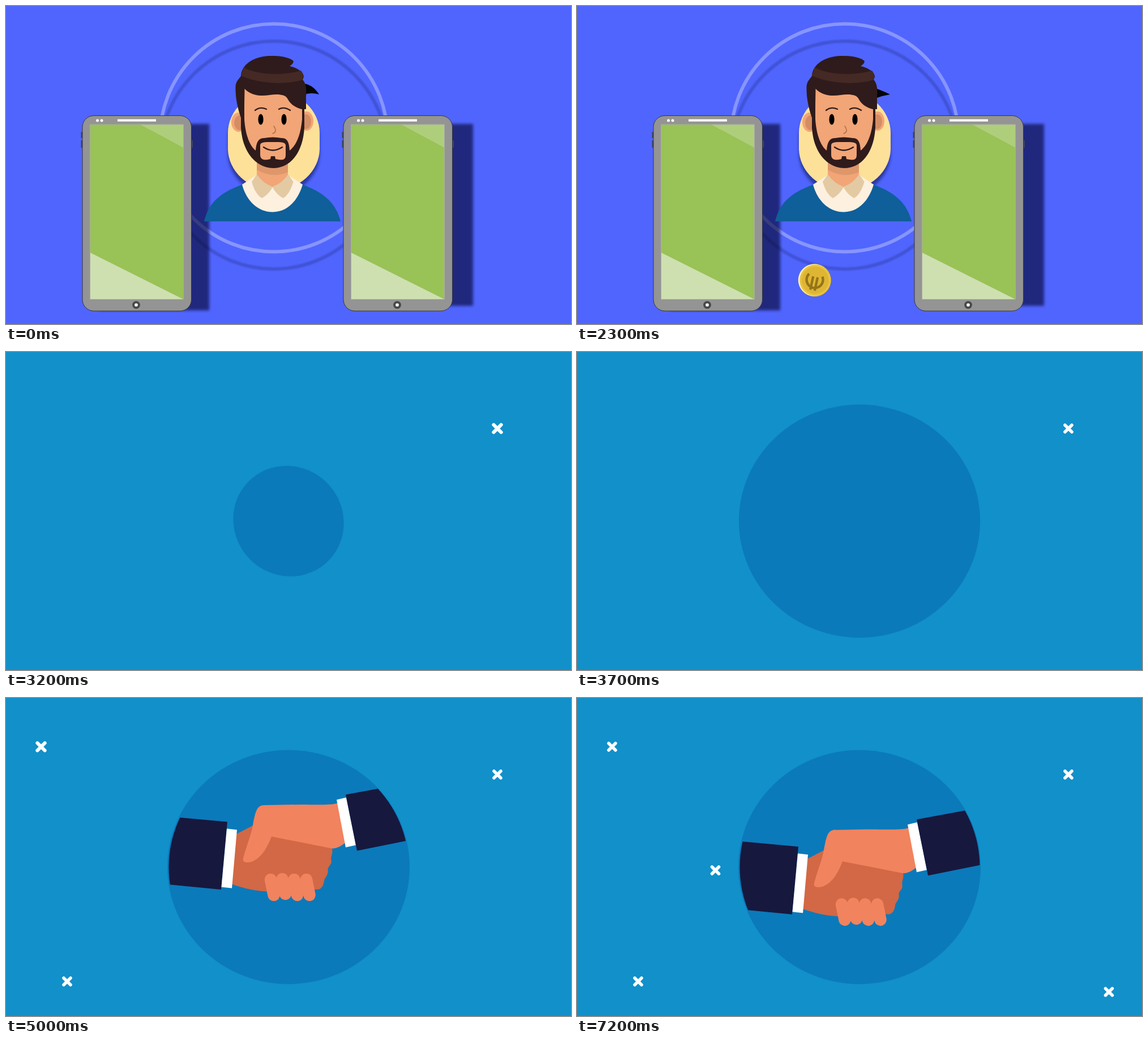
Animation, 998 px wide and 561 px high, one loop 7.3 s. Source, as an HTML page:

```html
<!DOCTYPE html>
<html lang="en">
<head>
<meta charset="utf-8">
<title>Mobile payment and handshake</title>
<style>
html, body { margin: 0; width: 100%; height: 100%; overflow: hidden; background: #5065fe; }
svg { display: block; width: 100%; height: 100%; }
</style>
</head>
<body>
<svg viewBox="0 0 998 561">
  <defs>
    <filter id="soft" x="-20%" y="-20%" width="140%" height="140%"><feGaussianBlur stdDeviation="2.5"/></filter>
    <filter id="faint"><feGaussianBlur stdDeviation="1.2"/></filter>
    <filter id="speed" filterUnits="userSpaceOnUse" x="200" y="100" width="600" height="900">
      <feGaussianBlur id="blur" stdDeviation="0 0"/>
    </filter>
    <clipPath id="disc"><ellipse cx="499.5" cy="298.5" rx="212" ry="207"/></clipPath>
    <g id="phone">
      <path d="M134 222v11M134 237v13M328.5 237v13" stroke="#41445c" stroke-width="3"/>
      <rect x="135" y="193.5" width="192.500" height="344.500" rx="20" fill="#949494" stroke="#35363c"/>
      <rect x="148.500" y="209" width="165" height="308.500" fill="#99c257"/>
      <path d="M148.500 435L313.500 517.500H148.500Z" fill="#cee0b0"/>
      <path d="M237 209H313.500V250Z" fill="#afce7c"/>
      <rect x="148.500" y="209" width="165" height="308.500" fill="none" stroke="#a9aba4"/>
      <path d="M197 201.700H265" stroke="#fff" stroke-width="4"/>
      <g fill="#fff"><circle cx="161.500" cy="202" r="2.500"/><circle cx="169" cy="202" r="2.500"/></g>
      <circle cx="230" cy="527.300" r="4.900" fill="#fff" stroke="#484848" stroke-width="4"/>
    </g>
    <path id="cross" d="M-6-6L6 6M6-6L-6 6" stroke="#fff" stroke-width="5.600" stroke-linecap="round"/>
    <path id="flap" d="M443 297L434 310C438 325 445 335 452 339C460 335 467 327 471 319Q454 313 443 297Z" fill="#e3caa3"/>
  </defs>

  <g id="pay">
    <rect width="998" height="561" fill="#5065fe"/>
    <circle cx="473" cy="263" r="201" fill="none" stroke="#4152d6" stroke-width="6" filter="url(#faint)"/>
    <circle cx="473" cy="232.500" r="201" fill="none" stroke="#8795ff" stroke-width="6"/>
    <g fill="#000526" fill-opacity=".6" filter="url(#soft)">
      <rect x="165" y="208" width="194" height="329"/>
      <rect x="626" y="208" width="199" height="321"/>
    </g>
    <rect x="392" y="159" width="162" height="175" rx="81" ry="74" fill="#1d2a80" opacity=".75" filter="url(#soft)"/>
    <rect x="392" y="150" width="162" height="175" rx="81" ry="74" fill="#fee199"/>

    <g id="person">
      <path id="spike" fill="#050508"/>
      <path d="M350 380C357 350 374 331 417 315H524C566 331 583 350 591 380Z" fill="#0f5f9b"/>
      <path d="M417 315L443 298H498L524 315C515 345 496 363.500 471 363.500S425 345 417 315Z" fill="#fef0df"/>
      <path d="M443 265H498V298Q487 315 471 320Q454 315 443 298Z" fill="#f2a576"/>
      <path d="M443 270H498V293Q471 305 443 289Z" fill="#de976b"/>
      <use href="#flap"/>
      <use href="#flap" transform="matrix(-1 0 0 1 941.500 0)"/>
      <g fill="#f2a576"><ellipse cx="411" cy="205" rx="13" ry="17"/><ellipse cx="531" cy="203" rx="12" ry="17"/></g>
      <g fill="#d58d63"><ellipse cx="413" cy="206" rx="10" ry="13"/><ellipse cx="530" cy="204" rx="9" ry="13"/></g>
      <path d="M415 150V215C418 262 445 286 472 286C500 286 524 262 527 215V150Z" fill="#2f1b1b"/>
      <path d="M420 135L421 200C423 230 432 248 441 255C442 240 446 233 456 233Q471 230 487 233C497 233 500 240 501 255C511 247 520 232 523 200V135Z" fill="#f2a576"/>
      <path d="M449 246C449 240 456 240 471 240S494 240 494 246V262C494 271 490 272 482 271L476 270L475 265H468L467 270C455 273 449 271 449 262Z" fill="#f2a576"/>
      <g fill="none" stroke="#2f1b1b" stroke-width="2.300" stroke-linecap="round">
        <path d="M455 249Q471 260 488 249M440 184Q449 177 460 182M482 182Q491 177 502 184"/>
        <path d="M473 212Q480 222 471 225" stroke="#b9754d" stroke-width="1.800"/>
      </g>
      <ellipse cx="450" cy="200" rx="4.600" ry="9.500"/>
      <ellipse cx="491" cy="200" rx="4.600" ry="9.500"/>
      <path d="M416 200C408 178 405 160 405.500 142C406 131 414 127 415 123C416 104 436 89 466 88C492 87 507 94 508 98C507 102 504 104 501 106C518 110 526 118 526 125L524 130C530 137 531 145 530 160V182H522C508 178 501 171 497 163C493 156 480 155 466 157C448 160 432 157 421.500 146L420.500 200Z" fill="#2f1b1b"/>
      <path d="M415 123L420 108C440 121 490 124 521 114Q527 121 524 130C495 140 445 137 415 123Z" fill="#452924"/>
    </g>

    <g id="coin">
      <circle r="29" fill="#c9a02c"/>
      <circle cy="-.800" r="28.300" fill="#fbf0bd"/>
      <circle cy="1" r="27.500" fill="#e9c340"/>
      <circle cy="1" r="24" fill="#deb634"/>
      <path d="M9-12A14.500 14.500 0 1 0 9 12M-18-4H6M-18 4H6" fill="none" stroke="#967517" stroke-width="4.300"/>
    </g>
    <use href="#phone"/>
    <use href="#phone" x="461"/>
  </g>

  <g id="deal">
    <rect width="998" height="561" fill="#1190ca"/>
    <ellipse id="spot" fill="#0b7aba"/>
    <g clip-path="url(#disc)">
      <g id="hands">
        <path d="M270 257L391 268L380 387.500L270 377Z" fill="#17183e"/>
        <path d="M404 291L437 274L480 280L576 315C578 325 573 328 574.500 336C576 344 568 346 568.500 353C570 362 562 367 562 372C560 384 555 389 545 387L470 391C442 391 418 385 397 377Z" fill="#d26845"/>
        <path d="M390 280L408 282L399 385L380.500 383Z" fill="#fff"/>
        <path d="M586 235C572 239 545 237.500 520 237.500L457 238.500C443 238 441 250 437 268C434 290 424 312 419 332C417 340 425 341 435 338C452 331 461 314 469 294L576 315C586 315 594 309 600 304Z" fill="#f1835e"/>
        <path d="M467.500 370L473 397M488 369L493.500 395M509 370L514.500 397M530.500 370L536 397" stroke="#f1835e" stroke-width="21.500" stroke-linecap="round"/>
        <path d="M584 229L601 225L618 309L600 313Z" fill="#fff"/>
        <path d="M600 220L720 198V299L620 319Z" fill="#17183e"/>
      </g>
    </g>
    <g id="marks"></g>
  </g>
</svg>
<script>
const LOOP = 7300, CUT = 3000;
const $ = id => document.getElementById(id);
const clamp = x => Math.min(1, Math.max(0, x));
const ease = x => (1 - Math.cos(Math.PI * clamp(x))) / 2;
const mix = (a, b, p) => a + (b - a) * p;
const set = (id, attrs) => {
  for (const k in attrs) $(id).setAttribute(k, attrs[k]);
};

// x, y and start time of each white cross
const marks = [[868, 135, 3000], [108, 500, 3900], [62, 86, 4780], [939.5, 518.5, 5640], [244.5, 304, 6550]];
$("marks").innerHTML = marks.map((m, i) => `<use id="m${i}" href="#cross"/>`).join("");

function pop(t) {
  if (t <= 0) return 0;
  const u = clamp(t / 350) - 1;
  return 1 + 2.7 * u ** 3 + 1.7 * u ** 2;
}

// Damped rise of the joined hands
const lift = t => 350 * Math.exp(-t / 483) * Math.cos(Math.PI * t / 1000) - 5.5;

function drawPay(t) {
  const turn = -180 + 180 * (ease(t / 1500) + ease((t - 1485) / 1500));
  set("coin", { transform: `translate(473 242) rotate(${turn}) translate(247.5 0) rotate(180)` });
  const p = ease((t - 1000) / 1300);
  const top = mix(137, 145, p);
  set("spike", {
    d: `M527 ${top}C${mix(540, 536, p)} ${mix(139, 148, p)} ${mix(548, 545, p)} ${mix(148, 152, p)} 553 156Q540 ${mix(152, 158, p)} 527 ${mix(156, 163, p)}Z`
  });
}

function drawDeal(t) {
  const u = 1 - clamp((t - CUT) / 750), s = 1 - u * u;
  set("spot", {
    rx: 214 * s, ry: 206.5 * s,
    transform: `translate(499 298.3) rotate(${83 * (1 - s)})`
  });
  const h = t - 4000;
  if (h > 0) {
    const speed = Math.abs(lift(h + 10) - lift(h - 10)) / 20;
    const moving = speed > 0.08;
    set("hands", {
      visibility: "inherit",
      transform: `translate(0 ${lift(h)})`,
      filter: moving ? "url(#speed)" : "none"
    });
    set("blur", { stdDeviation: `0 ${moving ? Math.min(4, speed * 3.5) : 0}` });
  } else {
    set("hands", { visibility: "hidden" });
  }
  marks.forEach(([x, y, start], i) =>
    set("m" + i, { transform: `translate(${x} ${y}) scale(${pop(t - start)})` }));
}

function draw(t) {
  const first = t < CUT;
  set("pay", { display: first ? "inline" : "none" });
  set("deal", { display: first ? "none" : "inline" });
  (first ? drawPay : drawDeal)(t);
}

const begin = performance.now();
function tick(now) {
  draw(Math.max(0, now - begin) % LOOP);
  requestAnimationFrame(tick);
}
draw(0);
requestAnimationFrame(tick);
</script>
</body>
</html>
```
